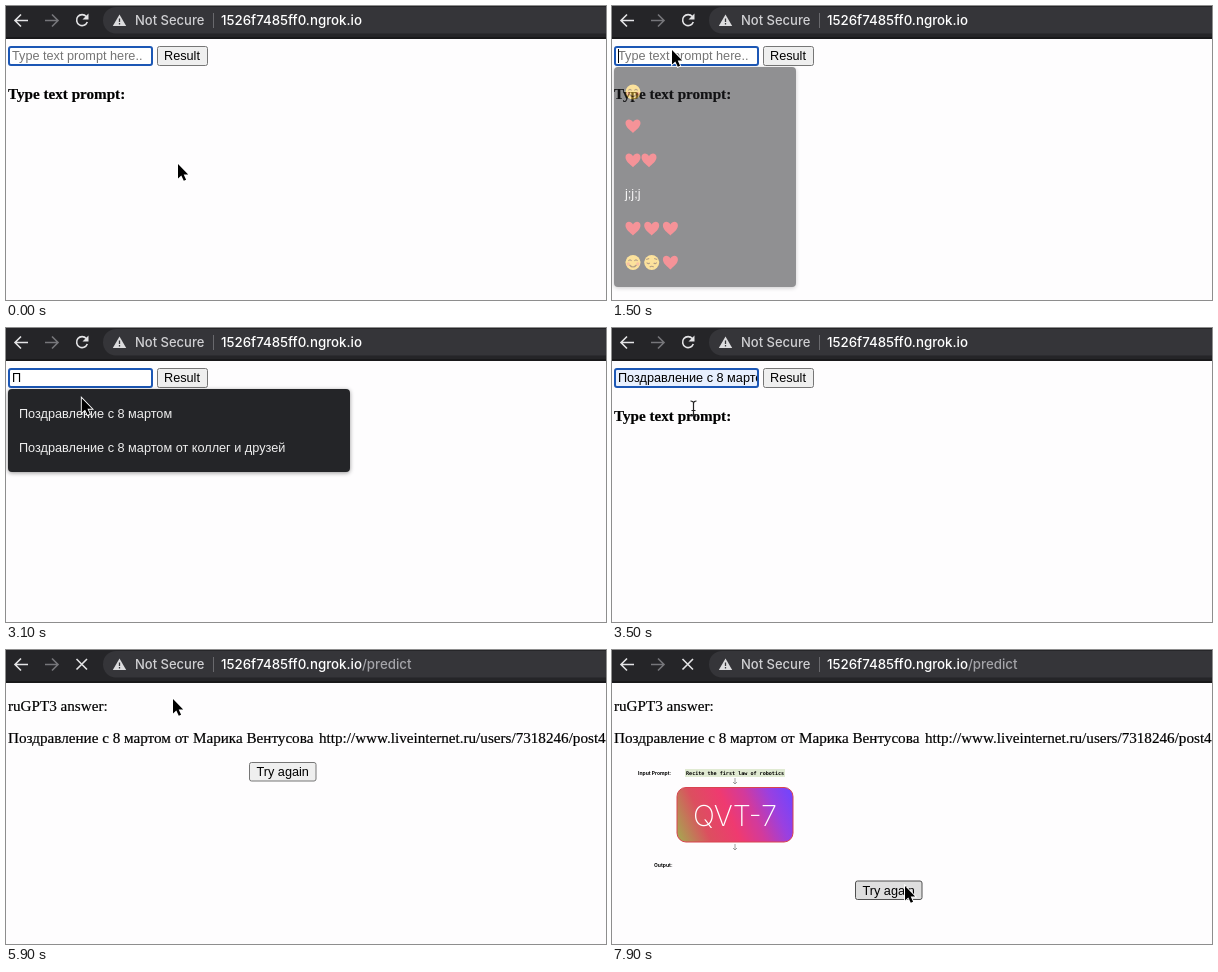
These frames come from a looping animation (600 by 294 pixels, 8000 ms). An HTML page:

```html
<!DOCTYPE html>
<html lang="en">
<head>
<meta charset="utf-8">
<title>Text prompt demo</title>
<style>
  html, body { margin: 0; width: 100%; height: 100%; overflow: hidden; background: #fefdfe; }
  svg { display: block; }
  .ui { font: 500 13px Inter, sans-serif; }
  .form { font: 12.7px "Liberation Sans", Arial, sans-serif; }
  .serif { font: 15.15px "Liberation Serif", Times, serif; stroke: #000; stroke-width: .2px; }
  .tiny { font: bold 5px Inter, sans-serif; }
  .button { fill: #efefef; stroke: #767676; }
  .button.hot { fill: #dedede; stroke: #505050; }
  .popup { fill: #242528; filter: drop-shadow(0 1px 2px #0006); }
  .line { fill: none; stroke-width: 1.6; }
</style>
</head>
<body>
<svg id="stage" width="600" height="294" viewBox="0 0 600 294">
  <defs>
    <linearGradient id="cardFill" gradientUnits="userSpaceOnUse" x1="66" y1="190" x2="180" y2="140">
      <stop offset="0" stop-color="#a5a850"/>
      <stop offset=".24" stop-color="#dc4f5f"/>
      <stop offset=".46" stop-color="#ef3a70"/>
      <stop offset=".64" stop-color="#d23a9c"/>
      <stop offset=".82" stop-color="#9a40e0"/>
      <stop offset="1" stop-color="#6f45ff"/>
    </linearGradient>
    <path id="heart" d="M0 7C-3 4-7.5 1-7.5-3C-7.5-7.500-2-8 0-4C2-8 7.500-7.500 7.500-3C7.500 1 3 4 0 7Z" fill="#ee2b35"/>
    <circle id="face" r="7.500" fill="#fcc83d"/>
    <g id="smile">
      <use href="#face"/>
      <g fill="#f58a4b"><circle cx="-4.800" cy="1.500" r="1.700"/><circle cx="4.800" cy="1.500" r="1.700"/></g>
      <path d="M-4.500-1.500q1.500-2.500 3 0M1.500-1.500q1.500-2.500 3 0M-3.500 2.500q3.500 4 7 0" fill="none" stroke="#6b4312" stroke-width="1.200"/>
    </g>
    <g id="pensive">
      <use href="#face"/>
      <path d="M-5 0q1.500 2 3 .5M2 .5q1.500 1.500 3-.5M-5.500-3l3-1M5.500-3l-3-1M-2 4.500q2-1.500 4 0" fill="none" stroke="#6b4312" stroke-width="1.200"/>
    </g>
    <path id="down" d="M0 0v6m-2-2l2 2l2-2" fill="none" stroke="#888" stroke-width=".8"/>
  </defs>

  <g id="formPage">
    <rect id="field" x="3" y="41" width="143" height="18" rx="2"/>
    <svg x="5" y="42" width="140" height="17" class="form"><text id="entry" x="1" y="12"></text></svg>
    <path id="caret" d="M6.500 43v14" stroke="#000"/>
    <rect id="resultButton" class="button" x="151.500" y="40.500" width="50" height="19" rx="2"/>
    <text class="form" x="158" y="54">Result</text>
    <text class="serif" x="2" y="93" style="font-weight:bold">Type text prompt:</text>
    <g id="history">
      <rect class="popup" x="2" y="61" width="182" height="220" rx="4"/>
      <g id="emoji"></g>
      <text class="form" x="13" y="192" fill="#eee">j;j;j</text>
    </g>
    <g id="matches">
      <rect class="popup" x="2" y="61" width="342" height="83" rx="4"/>
      <rect id="hover" x="2" y="69" width="342" height="34" fill="#43454a"/>
      <g class="form" fill="#eee">
        <text x="13" y="90">Поздравление с 8 мартом</text>
        <text x="13" y="124">Поздравление с 8 мартом от коллег и друзей</text>
      </g>
    </g>
  </g>

  <g id="answerPage">
    <g class="serif">
      <text x="2" y="61">ruGPT3 answer:</text>
      <text x="2" y="93">Поздравление с 8 мартом от</text>
      <text x="187" y="93">Марика Вентусова</text>
      <text x="313" y="93">http://www.liveinternet.ru/users/7318246/post4</text>
    </g>
    <g id="diagram">
      <text class="tiny" x="26" y="125">Input Prompt:</text>
      <rect x="73" y="119" width="100" height="8" fill="#e0ead2"/>
      <text x="74" y="125" style="font:bold 5.1px 'DejaVu Sans Mono',monospace">Recite the first law of robotics</text>
      <use href="#down" x="123" y="128"/>
      <rect x="65" y="137.500" width="116" height="54.500" rx="9" fill="url(#cardFill)" stroke="#d9434f"/>
      <text x="123" y="176" fill="#fff" text-anchor="middle" style="font:200 29px Inter,Lato,sans-serif">QVT-7</text>
      <use href="#down" x="123" y="194"/>
      <text class="tiny" x="42" y="217">Output:</text>
    </g>
    <g id="again">
      <rect id="againButton" class="button" x="243.500" y="112.500" width="66.500" height="18.500" rx="2"/>
      <text class="form" x="250.500" y="126">Try again</text>
    </g>
  </g>

  <rect width="600" height="33" fill="#19191b"/>
  <rect width="600" height="31" fill="#252528"/>
  <rect x="97" y="1" width="530" height="26.500" rx="13" fill="#353539"/>
  <path class="line" d="M22 14.500H9.500M15 8.500l-6 6l6 6" stroke="#e4e4e6"/>
  <path class="line" d="M39 14.500H51.500M46 8.500l6 6l-6 6" stroke="#76767a"/>
  <g id="reload">
    <path class="line" d="M80.300 10.500A5.500 5.500 0 1 0 81.300 16" stroke="#e4e4e6"/>
    <path d="M82.500 7.500v6h-6z" fill="#e4e4e6"/>
  </g>
  <path id="stop" class="line" d="M70.500 9l10.500 10.500M81 9L70.500 19.500" stroke="#e4e4e6"/>
  <path d="M113.500 8.500l6.700 11.500h-13.400z" fill="#dcdcde"/>
  <path d="M113.500 12.500v3.500m0 1v1.500" stroke="#353539" stroke-width="1.300"/>
  <path d="M207.500 7v15" stroke="#69696d"/>
  <g class="ui">
    <text x="129" y="19" fill="#d0d0d3">Not Secure</text>
    <text x="215" y="19" fill="#fff" font-size="13.3" style="font-size:13.3px">1526f7485ff0.ngrok.io<tspan id="path" fill="#a4a4a9">/predict</tspan></text>
  </g>

  <path id="arrow" d="M0 0v14.500l3.300-3.100l2.500 5.400l2.300-1l-2.400-5.300h4.500z" stroke="#fff" stroke-width="1.800" paint-order="stroke"/>
  <path id="beam" d="M-3-7.500q3 0 3 2.500q0-2.500 3-2.500M0-5v10M-3 7.500q3 0 3-2.500q0 2.500 3 2.500M-2 2h4" fill="none" stroke="#222" stroke-width="1.200"/>
</svg>
<script>
const $ = id => document.getElementById(id);
const show = (id, opacity) => $(id).style.opacity = +opacity;
const within = (t, from, to) => t >= from && t < to;
const clamp = v => Math.max(0, Math.min(1, v));

const rows = [["smile"], ["heart"], ["heart", "heart"], [], ["heart", "heart", "heart"], ["smile", "pensive", "heart"]];
$("emoji").innerHTML = rows.map((row, r) => row.map((name, i) =>
  `<use href="#${name}" x="${21 + i * (r === 2 ? 16 : 18.7)}" y="${86 + r * 34.1}"/>`).join("")).join("");

// time, x, y of the pointer
const route = [
  [0, 172, 158], [200, 82, 96], [500, 82, 96], [700, 60, 44], [2800, 60, 44],
  [3200, 81, 79], [3500, 81, 79], [3700, 98, 64], [4100, 167, 49],
  [6400, 167, 49], [7000, 293, 236], [8000, 293, 236]
];

function pointerAt(t) {
  const i = route.findIndex(key => key[0] > t);
  const [t0, x0, y0] = route[i - 1], [t1, x1, y1] = route[i];
  const k = (t - t0) / (t1 - t0);
  return [x0 + (x1 - x0) * k, y0 + (y1 - y0) * k];
}

function draw(t) {
  const answered = t >= 5900, loaded = t >= 6000;
  const chosen = t >= 3200, focused = t < 4000;
  const loading = within(t, 4000, 6100) || t >= 7500;

  show("formPage", !answered);
  show("answerPage", answered);
  show("path", answered);
  show("stop", loading);
  show("reload", !loading);

  $("field").setAttribute("fill", chosen ? "#e8f0fe" : "#fff");
  $("field").setAttribute("stroke", focused ? "#1c57b5" : "#767676");
  $("field").setAttribute("stroke-width", focused ? 2 : 1);
  $("entry").textContent = t < 2700 ? "Type text prompt here.." : chosen ? "Поздравление с 8 мартом" : "П";
  $("entry").setAttribute("fill", t < 2700 ? "#757575" : "#000");
  show("caret", t < 2600 && (t + 900) % 1000 < 500);
  show("history", t < 2700 ? clamp((t - 1300) / 400) : 0);
  show("matches", t < 2700 ? 0 : clamp((3500 - t) / 200));
  show("hover", chosen);
  $("resultButton").classList.toggle("hot", t >= 3900);

  show("diagram", loaded);
  $("again").setAttribute("transform", `translate(0 ${loaded ? 118.5 : 0})`);
  $("againButton").classList.toggle("hot", t >= 6900);

  const [x, y] = pointerAt(t);
  const beam = within(t, 2000, 3000) || within(t, 3400, 3900);
  show("beam", beam);
  show("arrow", !beam);
  $("beam").setAttribute("transform", `translate(${x + .5} ${y + 1.5})`);
  $("arrow").setAttribute("transform", `translate(${x} ${y})`);
}

function tick() {
  draw(Math.floor(performance.now() % 8000 / 100) * 100);
  requestAnimationFrame(tick);
}
tick();
</script>
</body>
</html>
```
